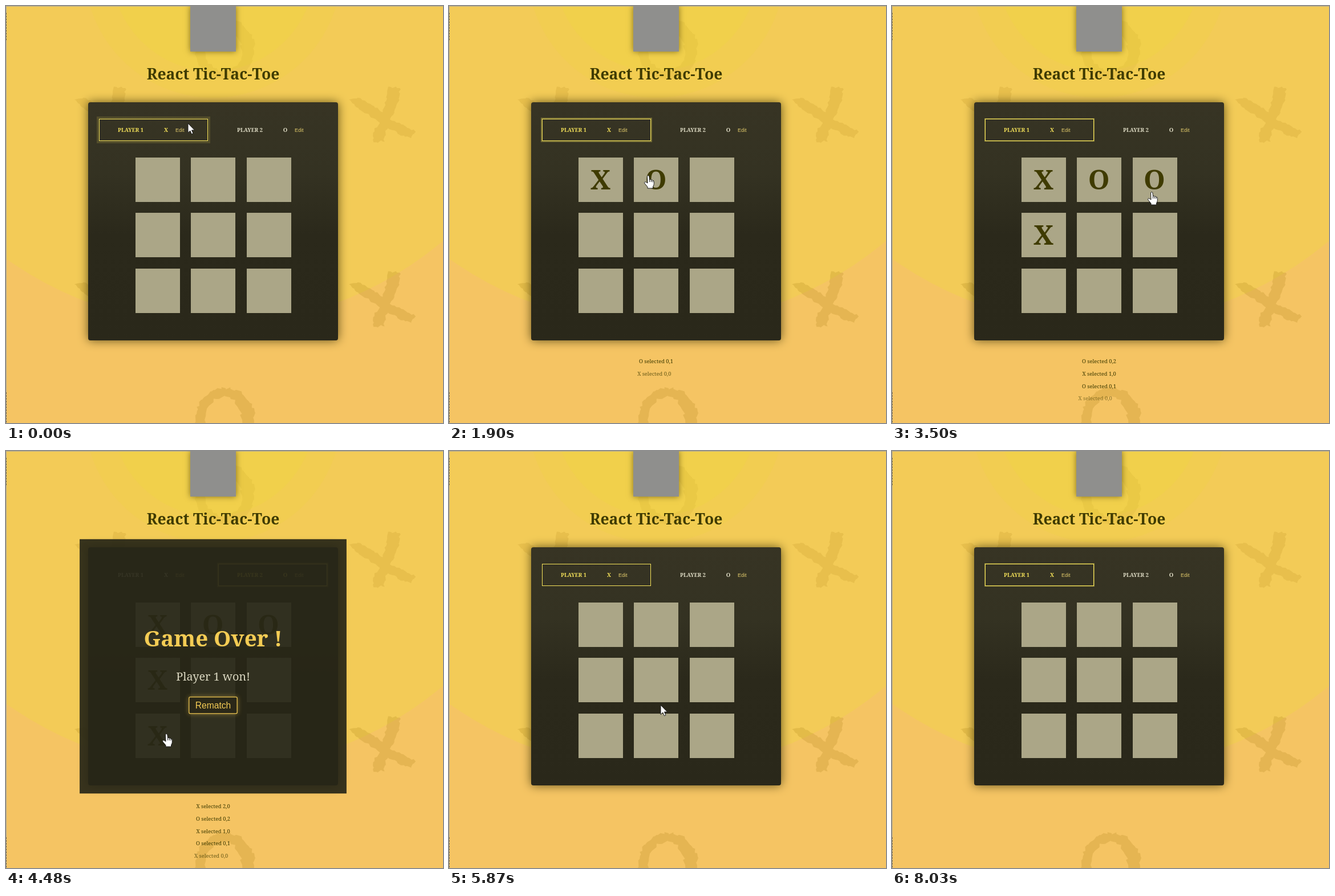
Animation, 766 px wide and 732 px high, one loop 8.05 s. Source, as an HTML page with a canvas:

```html
<!DOCTYPE html>
<html lang="en">
<head>
<meta charset="utf-8">
<title>React Tic-Tac-Toe</title>
<style>
  html, body { margin: 0; width: 100%; height: 100%; overflow: hidden; background: #f5c463; }
  canvas { display: block; }
</style>
</head>
<body>
<canvas id="stage" width="766" height="732"></canvas>
<script>
const W = 766, H = 732, LOOP = 8050, MID = 363;
const SERIF = '"Noto Serif", serif';
const SANS = '"Liberation Sans", Arial, sans-serif';
const GOLD = '#f6e35a', PALE = '#e1dec7', INK = '#3f3b00';
const ctx = document.getElementById('stage').getContext('2d');

const moves = [
  { at: 720, sym: 'X', row: 0, col: 0 },
  { at: 1440, sym: 'O', row: 0, col: 1 },
  { at: 2350, sym: 'X', row: 1, col: 0 },
  { at: 3230, sym: 'O', row: 0, col: 2 },
  { at: 4030, sym: 'X', row: 2, col: 0 }
];
const WON = 4030, REMATCH = 5760;

// time, x, y of the pointer tip
const path = [
  [0, 319, 206], [120, 319, 206], [420, 249, 299], [760, 249, 299],
  [1300, 349, 297], [1900, 349, 297], [2300, 272, 394], [2650, 272, 394],
  [3100, 455, 326], [3500, 455, 326], [3950, 281, 496], [4500, 281, 496],
  [5050, 363, 472], [5290, 363, 463], [5480, 367, 443], [5700, 367, 443],
  [5870, 371, 446], [6250, 371, 446], [7050, 690, 742], [LOOP, 690, 742]
];

const clamp = v => Math.max(0, Math.min(1, v));
const mix = (a, b, u) => a + (b - a) * u;
const smooth = u => u * u * (3 - 2 * u);
const cellPos = i => 227 + i * 97.25;

function text(str, x, y, font, color, align = 'center') {
  ctx.font = font;
  ctx.fillStyle = color;
  ctx.textAlign = align;
  ctx.fillText(str, x, y);
}

function disc(c, r, color) {
  c.fillStyle = color;
  c.beginPath();
  c.arc(MID, -64, r, 0, Math.PI * 2);
  c.fill();
}

function seeded(seed) {
  return () => (seed = (seed * 16807) % 2147483647) / 2147483647;
}

// closed outline with torn edges
function torn(c, pts, rnd, rough) {
  pts.forEach(([x, y], i) => {
    const [nx, ny] = pts[(i + 1) % pts.length];
    const n = Math.max(1, Math.round(Math.hypot(nx - x, ny - y) / 4));
    for (let k = 0; k < n; k++) {
      const px = mix(x, nx, k / n) + (rnd() - 0.5) * rough;
      const py = mix(y, ny, k / n) + (rnd() - 0.5) * rough;
      if (i || k) c.lineTo(px, py); else c.moveTo(px, py);
    }
  });
  c.closePath();
}

function ring(cx, cy, rx, ry, dir) {
  return Array.from({ length: 40 }, (_, i) => {
    const a = dir * i / 40 * Math.PI * 2;
    return [cx + rx * Math.cos(a), cy + ry * Math.sin(a)];
  });
}

const slash = [[70, 2], [88, 1], [88, 24], [78, 47], [66, 70], [61, 96], [42, 98], [41, 82], [53, 62], [60, 40], [66, 18]];
const bar = [[0, 22], [19, 21], [45, 37], [70, 57], [95, 69], [117, 78], [107, 91], [88, 85], [62, 70], [35, 52], [12, 38]];

function markX(c, x, y, alpha) {
  const rnd = seeded(77);
  c.save();
  c.translate(x, y);
  c.fillStyle = `rgba(150,110,0,${alpha})`;
  c.beginPath();
  torn(c, slash, rnd, 4);
  torn(c, bar, rnd, 4);
  c.fill();
  c.restore();
}

function markO(c, y, alpha) {
  const rnd = seeded(31);
  c.fillStyle = `rgba(150,110,0,${alpha})`;
  c.beginPath();
  torn(c, ring(383.5, y, 52, 53, 1), rnd, 5);
  torn(c, ring(381, y + 1, 32, 38, -1), rnd, 6);
  c.fill();
}

function shadowRect(c, x, y, w, h, r, fill, blur, shadow) {
  c.save();
  c.shadowColor = shadow;
  c.shadowBlur = blur;
  c.fillStyle = fill;
  c.beginPath();
  c.roundRect(x, y, w, h, r);
  c.fill();
  c.restore();
}

function buildBackdrop() {
  const layer = document.createElement('canvas');
  layer.width = W;
  layer.height = H;
  const c = layer.getContext('2d');
  c.fillStyle = '#f5c463';
  c.fillRect(0, 0, W, H);
  disc(c, 624, '#f3cb57');
  disc(c, 225, '#f2cd51');
  disc(c, 178, '#f1d04b');
  for (const x of [121, 602]) {
    markX(c, x, 141, 0.12);
    markX(c, x, 465, 0.17);
  }
  markO(c, 76, 0.08);
  markO(c, 724, 0.17);
  c.fillStyle = '#b5aa8c';
  c.fillRect(0, 0, W, 1);
  c.fillRect(0, 0, 1, H);
  c.fillStyle = '#5d5a50';
  for (let y = 12; y < 62; y += 5) c.fillRect(0, y, 1, 3);
  for (let y = 678; y < H; y += 5) c.fillRect(0, y, 1, 3);

  shadowRect(c, 323, 0, 80, 80, 0, '#8f8f8d', 10, 'rgba(60,50,0,.6)');

  const g = c.createLinearGradient(0, 169, 0, 587);
  g.addColorStop(0, '#373424');
  g.addColorStop(0.3, '#343222');
  g.addColorStop(0.56, '#2b291b');
  g.addColorStop(1, '#2a281a');
  shadowRect(c, 144, 169, 438, 418, 4, g, 18, 'rgba(51,44,4,.75)');
  c.fillStyle = '#aba687';
  for (let r = 0; r < 3; r++)
    for (let k = 0; k < 3; k++)
      c.fillRect(Math.round(cellPos(k)), Math.round(cellPos(r) + 39), 78, 78);
  return layer;
}

const backdrop = buildBackdrop();

function drawPlayer(x, name, sym, active, age) {
  const tint = active ? GOLD : PALE;
  if (active) {
    const u = clamp((age % 2000) / 1400);
    const spread = Math.min(4, Math.round(u * 6));
    if (spread && u < 1) {
      ctx.strokeStyle = `rgba(246,227,90,${0.55 * (1 - u) ** 1.4})`;
      ctx.lineWidth = spread;
      ctx.strokeRect(x - spread / 2, 198 - spread / 2, 191 + spread, 39 + spread);
    }
    ctx.strokeStyle = GOLD;
    ctx.lineWidth = 1;
    ctx.strokeRect(x + 0.5, 198.5, 190, 38);
  }
  text(name, x + 55.5, 221, `700 9.3px ${SERIF}`, tint);
  text(sym, x + 117.5, 221, `700 9.6px ${SERIF}`, tint);
  text('Edit', x + 134, 221, `9px ${SANS}`, '#e3cb6c', 'left');
}

function drawLog(done, t) {
  done.slice().reverse().forEach((m, i) => {
    let shift = 0, alpha = 1;
    if (i === done.length - 1) {
      const u = clamp((t - done[i].at) / 800);
      shift = -14 * (1 - u) ** 1.7;
      alpha = Math.sqrt(u);
    }
    ctx.globalAlpha = alpha;
    text(`${m.sym} selected ${m.row},${m.col}`, MID + shift, 626.7 + i * 21.9, `9.3px ${SERIF}`, INK);
    ctx.globalAlpha = 1;
  });
}

function drawGameOver(age) {
  const scale = age < 450
    ? mix(0.5, 1.068, Math.sin(age / 450 * Math.PI / 2))
    : mix(1.068, 1, smooth(clamp((age - 450) / 350)));
  ctx.save();
  ctx.globalAlpha = mix(0, 0.96, clamp(age / 430)) + 0.04 * clamp((age - 450) / 300);
  ctx.translate(MID, 378);
  ctx.scale(scale, scale);
  ctx.translate(-MID, -378);
  ctx.fillStyle = 'rgba(40,38,23,.96)';
  ctx.fillRect(144, 169, 438, 418);
  text('Game Over !', MID, 345, `900 36px ${SERIF}`, '#fcd256');
  text('Player 1 won!', MID, 401, `18.6px ${SERIF}`, PALE);
  shadowRect(ctx, 323, 428, 80, 28, 2, '#282617', 8, 'rgba(252,210,86,.45)');
  ctx.strokeStyle = '#fcd256';
  ctx.lineWidth = 1.2;
  ctx.beginPath();
  ctx.roundRect(323.5, 428.5, 79, 27, 2);
  ctx.stroke();
  text('Rematch', MID, 447, `14.6px ${SANS}`, '#fcd256');
  ctx.restore();
}

function pointerAt(t) {
  const i = path.findIndex(p => p[0] > t);
  const [t0, x0, y0] = path[i - 1], [t1, x1, y1] = path[i];
  const u = smooth((t - t0) / (t1 - t0));
  return [Math.round(mix(x0, x1, u)), Math.round(mix(y0, y1, u))];
}

function overCell(x, y) {
  const inside = (v, start) => [0, 1, 2].some(i => v >= start + i * 97.25 && v < start + i * 97.25 + 78);
  return inside(x, 227) && inside(y, 266);
}

const arrow = new Path2D('M0 0V16.5L3.8 13 6.4 18.8 9 17.6 6.5 12H11.6Z');
const hand = new Path2D('M-1.5 1.5Q0-.5 1.8 1.5L2.6 8Q4.5 6.6 5.4 8.4 7.4 7.4 8 9.4 10.2 9 10.3 11.4V15.5Q10 18 8.6 20V23H-1V20.5L-6 14.5Q-7.2 12.4-5.4 11.8-3.8 11.5-1 14Z');
const fingers = new Path2D('M2.6 8V12M5.4 8.6V12M8 9.6V12.4');

function drawPointer(t) {
  const [x, y] = pointerAt(t);
  const overButton = x > 323 && x < 403 && y > 428 && y < 456;
  const pointing = t > 4550 && t < REMATCH ? overButton : overCell(x, y);
  ctx.save();
  ctx.translate(x, y);
  ctx.fillStyle = '#fff';
  ctx.strokeStyle = '#1a1a1a';
  ctx.lineWidth = 1;
  ctx.lineJoin = 'round';
  const shape = pointing ? hand : arrow;
  ctx.fill(shape);
  ctx.stroke(shape);
  if (pointing) ctx.stroke(fingers);
  ctx.restore();
}

function draw(t) {
  const playing = t < REMATCH;
  const done = playing ? moves.filter(m => t >= m.at) : [];
  const first = done.length % 2 === 0;
  let turnStart = playing ? -850 : REMATCH;
  if (done.length) turnStart = done[done.length - 1].at;

  ctx.drawImage(backdrop, 0, 0);
  text('React Tic-Tac-Toe', MID, 128.5, `900 26.5px ${SERIF}`, INK);
  drawPlayer(163, 'PLAYER 1', 'X', first, t - turnStart);
  drawPlayer(372, 'PLAYER 2', 'O', !first, t - turnStart);
  for (const m of done)
    text(m.sym, cellPos(m.col) + 38.5, cellPos(m.row) + 95, `900 48px ${SERIF}`, INK);
  drawLog(done, t);
  if (playing && t >= WON) drawGameOver(t - WON);
  drawPointer(t);
}

const start = performance.now();
function tick(now) {
  draw(Math.max(0, now - start) % LOOP);
  requestAnimationFrame(tick);
}
draw(0);
requestAnimationFrame(tick);
</script>
</body>
</html>
```
